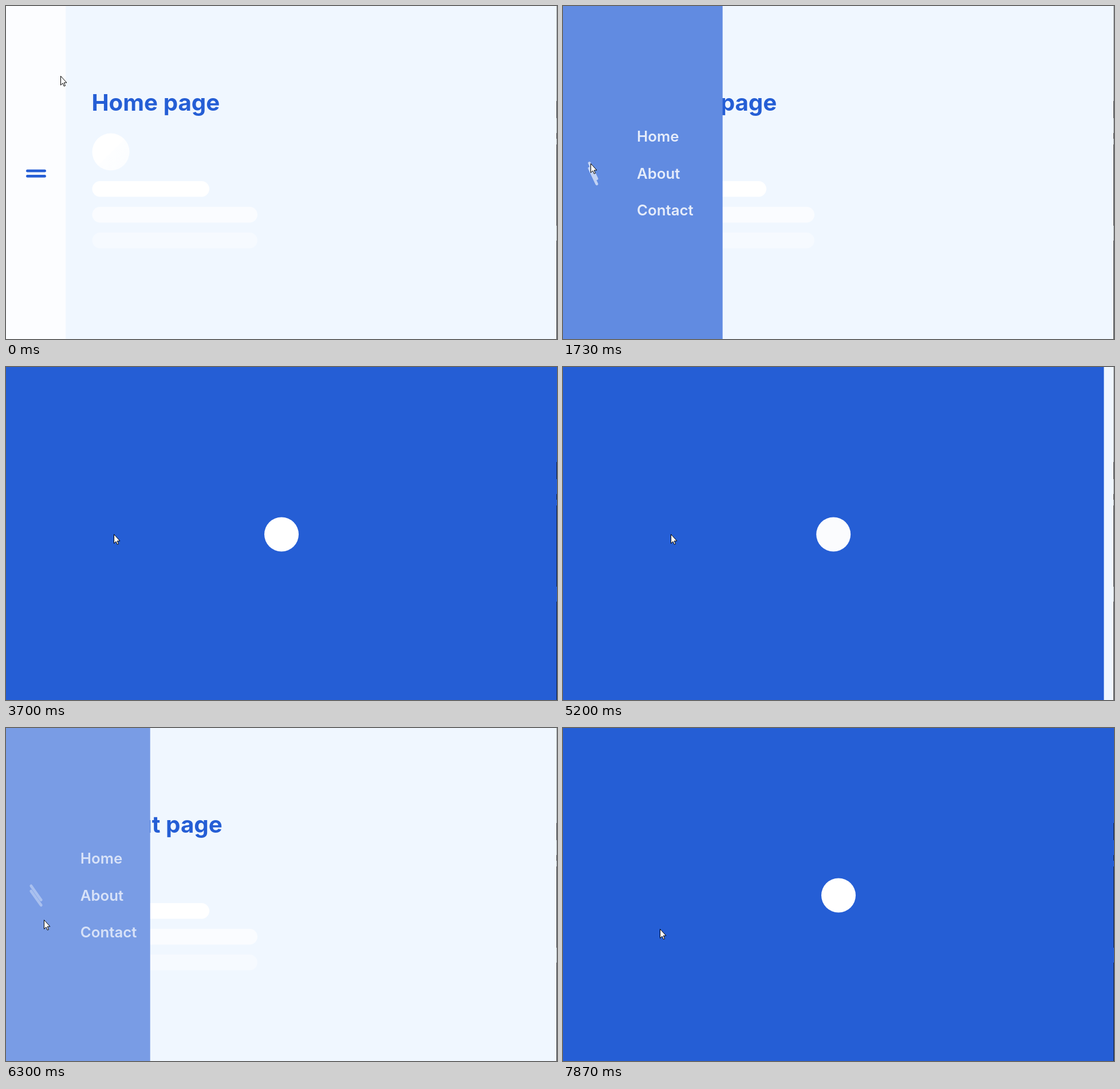
These frames come from a looping animation (962 by 582 pixels, 8000 ms). An HTML page with a canvas:

```html
<!DOCTYPE html>
<html lang="en">
<head>
<meta charset="utf-8">
<title>Sidebar menu</title>
<style>
  html, body { margin: 0; width: 100%; height: 100%; overflow: hidden; background: #f0f7ff; }
  canvas { display: block; }
</style>
</head>
<body>
<canvas id="stage" width="962" height="582"></canvas>
<script>
const ctx = document.getElementById('stage').getContext('2d');
const W = 962, H = 582, LOOP = 8000;
const BLUE = [37, 94, 213], PALE = [252, 253, 255], WHITE = [255, 255, 255];
const FONT = 'Montserrat, Inter, "Open Sans", sans-serif';
const SWAP = 4500; // page changes behind the curtain

const lerp = (a, b, p) => a + (b - a) * p;
const clamp = v => Math.max(0, Math.min(1, v));
const rgb = c => `rgb(${c.map(Math.round).join(',')})`;
const mix = (a, b, p) => rgb(a.map((v, i) => lerp(v, b[i], p)));
const smooth = s => s * s * (3 - 2 * s);

// cubic-bezier(.25, .1, .25, 1)
function ease(x) {
  if (x <= 0) return 0;
  if (x >= 1) return 1;
  const curve = (a, b, s) => 3 * a * s * (1 - s) ** 2 + 3 * b * s * s * (1 - s) + s ** 3;
  let lo = 0, hi = 1;
  for (let i = 0; i < 24; i++) {
    const s = (lo + hi) / 2;
    if (curve(0.25, 0.25, s) < x) lo = s; else hi = s;
  }
  return curve(0.1, 1, lo);
}

// Eased 0..1 progress of a transition
const since = (t, start, dur) => ease((t - start) / dur);

function sidebarOpen(t) {
  if (t < 1000) return 0.09 * (since(t, 20, 60) - since(t, 80, 220));
  return since(t, t < SWAP ? 1475 : 6090, 600);
}

const curtainShown = t => since(t, 3190, 400) - since(t, 5188, 400) + since(t, 7355, 400);

const links = [
  { label: 'Home', hovers: [] },
  { label: 'About', hovers: [[2080, 2410], [2800, 3190]] },
  { label: 'Contact', hovers: [[6960, 7355]] }
];

// Pointer moves: start, end, x, y
const moves = [
  [0, 1, 95, 122],
  [30, 330, 424, 533],
  [630, 1730, 48, 275],
  [1730, 2430, 211, 302],
  [2730, 2900, 188, 292],
  [5200, 5390, 207, 293],
  [5770, 5830, 216, 300],
  [5970, 6200, 66, 335],
  [6300, 6670, 112, 345],
  [6830, 7030, 159, 349],
  [7030, 7200, 169, 351]
];

function pointerAt(t) {
  let [, , x, y] = moves[0];
  for (const [start, end, toX, toY] of moves) {
    const p = smooth(clamp((t - start) / (end - start)));
    x = lerp(x, toX, p);
    y = lerp(y, toY, p);
  }
  return [Math.round(x), Math.round(y)];
}

function pill(x, y, w, h, fill) {
  ctx.fillStyle = fill;
  ctx.beginPath();
  ctx.roundRect(x, y, w, h, Math.min(w, h) / 2);
  ctx.fill();
}

function text(str, x, y, font, fill) {
  ctx.font = `${font} ${FONT}`;
  ctx.fillStyle = fill;
  ctx.fillText(str, x, y);
}

function drawPage(t) {
  ctx.fillStyle = '#f0f7ff';
  ctx.fillRect(0, 0, W, H);
  text(t < SWAP ? 'Home page' : 'About page', 149.5, 183, '700 40.3px', rgb(BLUE));

  const shine = ctx.createLinearGradient(150, 222, 216, 288);
  shine.addColorStop(0.5, '#fff');
  shine.addColorStop(0.52, '#fdfeff');
  shine.addColorStop(1, '#fbfdff');
  pill(150.5, 222.5, 65, 65, shine);
  for (let i = 0; i < 3; i++)
    pill(150.5, 306 + 45 * i, i ? 288.5 : 204.5, 27.5, `rgba(255,255,255,${1 - 0.31 * i})`);

  ctx.fillStyle = '#9a9da1';
  ctx.fillRect(W - 1, 0, 1, H);
}

function drawSidebar(t) {
  const p = sidebarOpen(t), w = lerp(104.5, 347, p);
  ctx.save();
  ctx.beginPath();
  ctx.rect(0, 0, w, H);
  ctx.clip();
  ctx.fillStyle = mix(PALE, BLUE, p);
  ctx.fillRect(0, 0, w, H);

  for (const side of [-1, 1]) {
    ctx.save();
    ctx.translate(52.5, 292.8 + 4.6 * side);
    ctx.rotate(p * Math.PI / 2);
    pill(-17.5, -2.4, 35, 4.8, mix(BLUE, WHITE, p));
    ctx.restore();
  }

  links.forEach(({ label, hovers }, i) => {
    const dim = hovers.reduce((sum, [on, off]) => sum + since(t, on, 200) - since(t, off, 200), 0);
    ctx.globalAlpha = clamp(p * 1.17) * (1 - 0.4 * dim);
    text(label, 127 + 7 * (1 - p), 237 + 64.5 * i, '600 25.8px', '#fff');
  });
  ctx.restore();
}

function drawCurtain(t) {
  const p = curtainShown(t), w = p * W;
  if (p <= 0) return;
  ctx.save();
  ctx.beginPath();
  ctx.rect(0, 0, w, H);
  ctx.fillStyle = rgb(BLUE);
  ctx.fill();
  ctx.clip();
  ctx.globalAlpha = p;
  pill(w / 2 - 30, 262.5, 60, 60, '#fff');
  ctx.restore();
}

// Dark marks along the right border
function drawEdge() {
  ctx.fillStyle = 'rgba(0,0,0,.65)';
  for (const [top, bottom] of [[166, 196], [222, 232], [242, 384], [410, H]])
    ctx.fillRect(W - 1, top, 1, bottom - top);
}

const arrow = new Path2D('M.5 .5V16.3L4 12.9L6.3 18.2L8.5 17.3L6.3 12H11Z');
const hand = new Path2D('M-1.5 11V1.6Q-1.5 0 0 0Q1.6 0 1.6 1.6V6.5Q1.8 5 3.2 5Q4.7 5 4.8 6.8' +
  'Q5.1 5.8 6.4 6Q7.8 6.2 7.8 7.8Q8.2 7 9.4 7.2Q10.8 7.5 10.8 9.2V14Q10.8 17 9 19V21.5H0V19.5' +
  'L-4.5 13Q-5.6 11.3-4.4 10.4Q-3.2 9.6-1.5 11.5Z');
const knuckles = new Path2D('M1.6 6.5V11M4.8 6.8V11M7.8 7.8V11');

function drawPointer(t) {
  const [x, y] = pointerAt(t);
  const over = links.some(l => l.hovers.some(([on, off]) => t >= on && t < off));
  const shape = over ? hand : arrow;
  ctx.save();
  ctx.translate(x, y);
  ctx.lineWidth = 1;
  ctx.lineJoin = 'round';
  ctx.fillStyle = '#fff';
  ctx.strokeStyle = '#000';
  ctx.fill(shape);
  ctx.stroke(shape);
  if (over) ctx.stroke(knuckles);
  ctx.restore();
}

function frame(now) {
  const t = now % LOOP;
  drawPage(t);
  drawSidebar(t);
  drawCurtain(t);
  drawEdge();
  drawPointer(t);
  requestAnimationFrame(frame);
}
requestAnimationFrame(frame);
</script>
</body>
</html>
```
